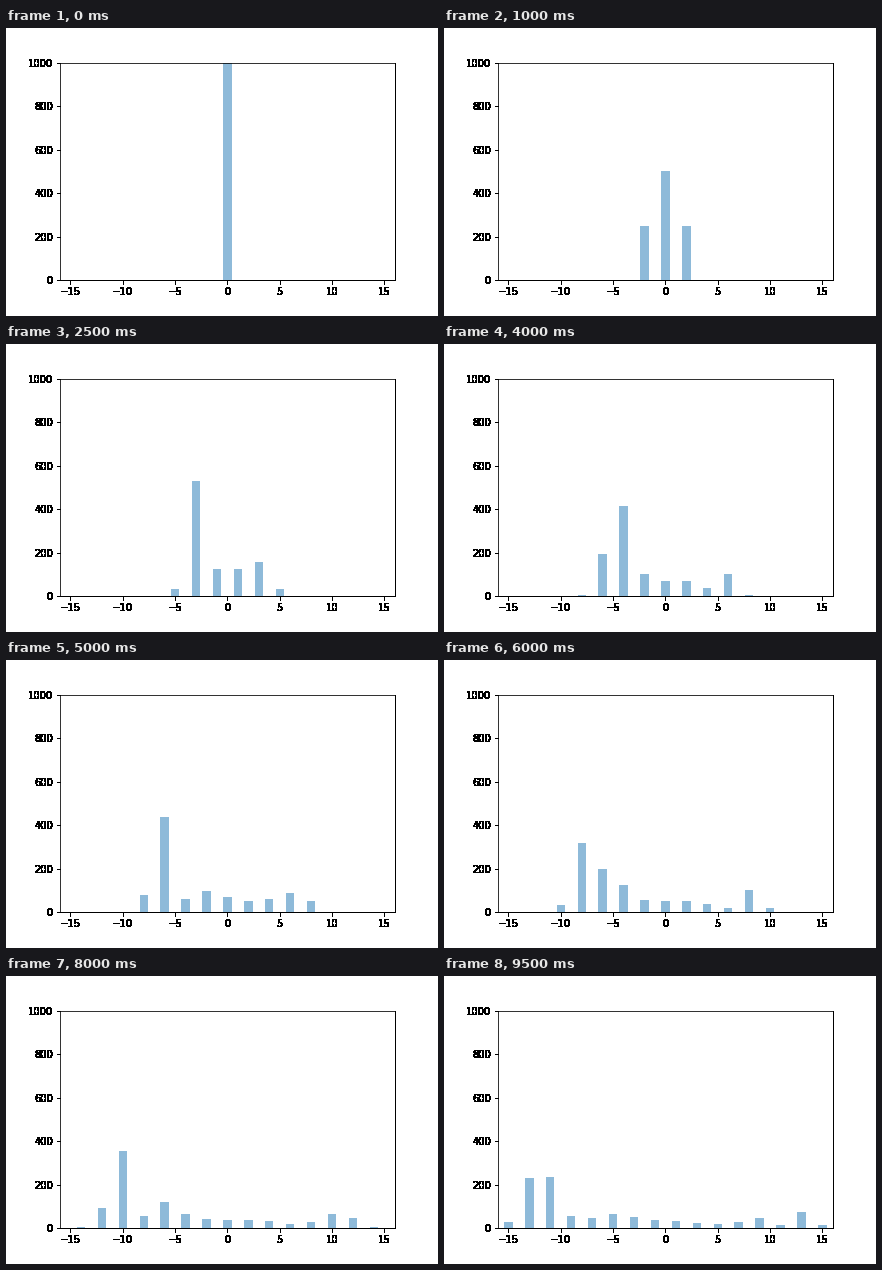
A matplotlib script for the animation above (10 s loop, 432 by 288 pixels).

```python
import numpy as np
import matplotlib.pyplot as plt
from matplotlib.animation import FuncAnimation

# Hadamard walk: expected counts out of 1000 trials, one step per frame.
STEPS, TRIALS = 20, 1000
POSITIONS = np.arange(-STEPS, STEPS + 1)


def counts_at(step):
    left = np.zeros(len(POSITIONS))
    right = np.zeros(len(POSITIONS))
    left[STEPS] = 1
    for _ in range(step):
        left, right = (np.roll((left + right) / np.sqrt(2), -1),
                       np.roll((left - right) / np.sqrt(2), 1))
    return np.round(TRIALS * (left ** 2 + right ** 2))


def harden(image, dpi):
    """Turn every touched pixel solid black, without soft edges."""
    solid = np.zeros_like(image)
    solid[..., 3] = image[..., 3] > 0
    return solid, 0, 0


plt.rcParams.update({"font.family": "DejaVu Sans", "font.size": 10})
fig = plt.figure(figsize=(6, 4), dpi=72, facecolor="white")
ax = fig.add_axes([0.125, 0.125, 0.775, 0.755])
bars = ax.bar(POSITIONS, counts_at(0), width=0.8, color="C0", alpha=0.5)
ax.set(xlim=(-16, 16), ylim=(0, TRIALS),
       xticks=range(-15, 16, 5), yticks=range(0, TRIALS + 1, 200))

for artist in [*ax.get_xticklabels(), *ax.get_yticklabels(),
               *ax.get_xticklines(), *ax.get_yticklines(),
               ax.spines["right"], ax.spines["bottom"]]:
    artist.set_agg_filter(harden)


def update(step):
    for bar, count in zip(bars, counts_at(step)):
        bar.set_height(count)
    return bars


anim = FuncAnimation(fig, update, frames=STEPS, interval=500,
                     repeat=True, repeat_delay=0)
plt.show()
```
